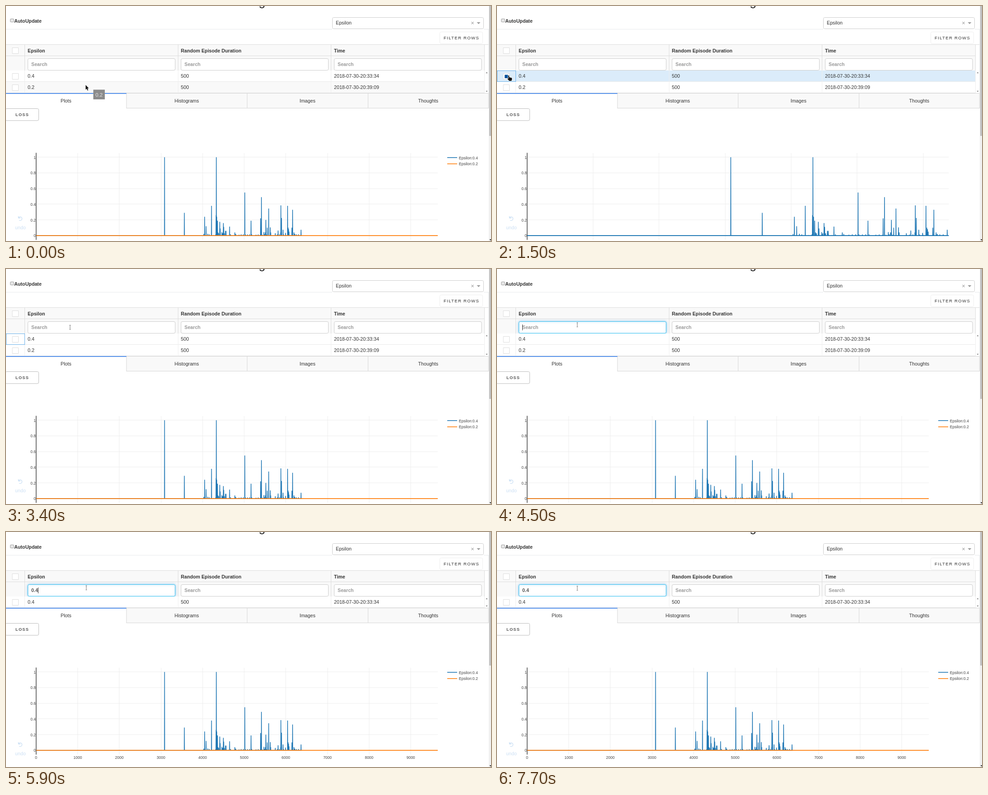
These frames come from a looping animation (1075 by 521 pixels, 8 s). An HTML page with a canvas:

```html
<!DOCTYPE html>
<html lang="en">
<head>
<meta charset="utf-8">
<title>Experiment dashboard</title>
<style>
  html, body { margin: 0; width: 100%; height: 100%; overflow: hidden; background: #fff; }
  canvas { display: block; }
</style>
</head>
<body>
<canvas id="stage" width="1075" height="521"></canvas>
<script>
const ctx = document.getElementById('stage').getContext('2d');
const LOOP = 8000;
const BLUE = '#1f77b4', ORANGE = '#ff7f0e', FONT = '"Liberation Sans", Arial, sans-serif';
const COLUMNS = [48, 387.5, 727];
const COLUMN_EDGES = [41, 381, 720, 1060];

// Training step and loss of each visible spike.
const SPIKES = [
  3086, 1, 3562, .29, 4029, .02, 4049, .24, 4084, .12, 4125, .022, 4214, .38, 4323, .26,
  4330, 1, 4340, .24, 4357, .19, 4371, .04, 4385, .03, 4412, .175, 4422, .09, 4463, .045,
  4480, .03, 4498, .16, 4508, .11, 4522, .03, 4549, .06, 4562, .06, 4648, .115, 4775, .04,
  4797, .02, 5014, .55, 5164, .19, 5393, .22, 5414, .49, 5472, .045, 5506, .04, 5519, .2,
  5554, .1, 5588, .345, 5626, .105, 5636, .04, 5745, .03, 5813, .065, 5875, .04, 5881, .385,
  5896, .225, 5933, .075, 5991, .035, 6042, .38, 6056, .1, 6066, .08, 6076, .05, 6145, .1,
  6162, .33, 6196, .04, 6216, .02, 6364, .075
];

function rect(x, y, w, h, color) {
  ctx.fillStyle = color;
  ctx.fillRect(x, y, w, h);
}

function box(x, y, w, h, radius, fill, stroke) {
  ctx.beginPath();
  ctx.roundRect(x, y, w, h, radius);
  ctx.fillStyle = fill;
  ctx.fill();
  ctx.lineWidth = 1;
  ctx.strokeStyle = stroke;
  ctx.stroke();
}

// y is the middle of the capitals.
function text(str, x, y, { size = 10.7, bold = false, color = '#333', align = 'left', spacing = 0 } = {}) {
  ctx.font = `${bold ? 'bold ' : ''}${size}px ${FONT}`;
  ctx.letterSpacing = spacing + 'px';
  ctx.textAlign = align;
  ctx.fillStyle = color;
  ctx.fillText(str, x, y + size * .355);
}

function polygon(points, fill, stroke) {
  ctx.beginPath();
  points.forEach(([x, y]) => ctx.lineTo(x, y));
  ctx.closePath();
  if (stroke) {
    ctx.strokeStyle = stroke;
    ctx.lineWidth = 1.4;
    ctx.stroke();
  }
  ctx.fillStyle = fill;
  ctx.fill();
}

// A negative height points up.
function triangle(x, y, halfWidth, height, color) {
  polygon([[x - halfWidth, y], [x + halfWidth, y], [x, y + height]], color);
}

function drawTop() {
  text('g', 567.5, -10.2, { size: 27, align: 'center', color: '#2b2b2b' });
  box(9.5, 28.5, 8, 7, 1.5, '#e6e6e6', '#a5a5a5');
  text('AutoUpdate', 18.3, 33.3, { bold: true });
  box(723.5, 25.5, 335, 25, 3, '#fff', '#ccc');
  text('Epsilon', 731, 37.7);
  text('×', 1034, 37, { size: 13, align: 'center', color: '#999' });
  triangle(1047.5, 36, 4, 4, '#999');
  rect(0, 51, 723, 1, '#e7eaec');
  rect(1059, 51, 11, 1, '#e7eaec');
  rect(1069, 51, 1, 142, '#e7eaec');
  box(961.5, 57.5, 95, 26, 3, '#fff', '#eee');
  text('FILTER ROWS', 970, 70.5, { size: 9.6, spacing: 1.3 });
}

function drawCheckbox(y, checked) {
  box(14, y, 13.5, 13, 0, '#fff', '#ddd');
  if (checked) rect(17, y + 3, 7.5, 7.5, '#00529b');
}

function drawSearch(x, value, focused, caret) {
  ctx.save();
  if (focused) {
    ctx.shadowColor = 'rgba(102,175,233,.7)';
    ctx.shadowBlur = 5;
  }
  box(x + .5, 116.5, 326.5, 26, 3, '#fff', focused ? '#33c3f0' : '#ccc');
  ctx.restore();
  text(value || 'Search', x + 8, 129.3, { bold: true, color: value ? '#555' : '#999' });
  if (caret) rect(x + 8 + (value ? ctx.measureText(value).width : 0), 123, 1, 13, '#333');
}

function drawGrid(t, filtered) {
  rect(0, 85, 1061, 58, '#f9f9f9');
  rect(0, 85, 1070, 1, '#ddd');
  rect(0, 110, 1061, 1, '#ddd');
  COLUMN_EDGES.forEach(x => rect(x, 86, 1, 57, '#ddd'));
  drawCheckbox(92.5);
  ['Epsilon', 'Random Episode Duration', 'Time'].forEach((name, i) =>
    text(name, COLUMNS[i], 99.7, { bold: true }));

  const typed = t < 5200 ? '' : t < 5600 ? '0' : t < 5900 ? '0.' : '0.4';
  const caret = (t >= 4500 && t < 5000) || (t >= 5200 && t < 6400) || (t >= 7100 && t < 7700);
  COLUMNS.forEach((x, i) => {
    const active = i === 0 && t >= 4400;
    drawSearch(x, i ? '' : typed, active, active && caret);
  });

  const selected = t >= 1000 && t < 2300;
  const hovered = t < 500 ? 1 : t < 3400 ? 0 : -1;
  const rows = [['0.4', '500', '2018-07-30-20:33:34'], ['0.2', '500', '2018-07-30-20:39:09']];
  rows.slice(0, filtered ? 1 : 2).forEach((cells, i) => {
    const y = 143 + 25 * i, chosen = i === 0 && selected;
    rect(0, y, 1061, 25, chosen ? '#dbecfa' : hovered === i ? '#f9f9f9' : '#fff');
    rect(0, y + 24, 1061, 1, '#e9e9e9');
    COLUMN_EDGES.forEach(x => rect(x, y, 1, 25, '#eee'));
    drawCheckbox(y + 6.5, chosen);
    cells.forEach((cell, j) => text(cell, COLUMNS[j], y + 12.3));
  });
  if (t >= 900 && t < 4400) {
    ctx.lineWidth = 1;
    ctx.strokeStyle = '#66afe9';
    ctx.strokeRect(.5, 143.5, 41, 24);
  }
  triangle(1065.5, 149, 2, -2.5, '#777');
  triangle(1065.5, filtered ? 163 : 188, 2, 2.5, '#777');
}

function drawTabs() {
  rect(0, 193, 1070, 34, '#f9f9f9');
  rect(267, 193, 803, 1, '#d6d6d6');
  rect(267, 226, 803, 1, '#d6d6d6');
  rect(0, 193, 267, 34, '#fff');
  rect(0, 193, 267, 1.7, '#3d82ea');
  [266.5, 534, 802, 1069].forEach(x => rect(x, 194, 1, 33, '#d6d6d6'));
  ['Plots', 'Histograms', 'Images', 'Thoughts'].forEach((name, i) =>
    text(name, 133 + 267.6 * i, 210.6, { align: 'center' }));
  box(-1.5, 227.5, 74, 26.5, 3, '#fff', '#bbb');
  text('LOSS', 21, 241, { size: 9.1, bold: true, color: '#555', spacing: 1.35 });
}

function drawChart(single) {
  const left = 66.7, right = single ? 1001.5 : 957, zero = 509, unit = 173.8;
  const perStep = single ? .14632 : .09227;
  const px = step => left + step * perStep;
  const label = { size: 8.5, color: '#444' };

  for (let step = 0; px(step) < right; step += 1000) {
    if (step) rect(Math.round(px(step)) - .5, 326, 1, 192, '#eee');
    text(step, px(step), 525.3, { ...label, align: 'center' });
  }
  for (let i = 0; i <= 5; i++) {
    const y = zero - unit * i / 5;
    if (i) rect(left, Math.round(y) - .5, right - left, 1, '#eee');
    text(i % 5 ? (i / 5).toFixed(1) : i / 5, 66, y + .3, { ...label, align: 'right' });
  }
  rect(66, 325.5, 1.5, 193, '#444');

  ctx.beginPath();
  ctx.moveTo(left, zero);
  const spike = (step, value) => {
    ctx.lineTo(px(step) - .3, zero);
    ctx.lineTo(px(step), zero - unit * value);
    ctx.lineTo(px(step) + .3, zero);
  };
  for (let i = 0; i < SPIKES.length; i += 2) spike(SPIKES[i], SPIKES[i + 1]);
  ctx.moveTo(px(4100), zero);
  for (let i = 0; i < 44; i++) spike(4110 + i * 51, .016 * Math.abs(Math.sin(i * i * 1.7)));
  ctx.lineJoin = 'bevel';
  ctx.lineWidth = 1.5;
  ctx.strokeStyle = BLUE;
  ctx.stroke();
  rect(left, zero - .9, (single ? right : px(6380)) - left, 1.8, BLUE);

  if (single) return;
  rect(left, zero - .9, right - left, 1.8, ORANGE);
  [[BLUE, '0.4'], [ORANGE, '0.2']].forEach(([color, value], i) => {
    rect(978, 335.3 + 13.8 * i, 22, 1.6, color);
    text('Epsilon:' + value, 1003.8, 336.5 + 13.8 * i, label);
  });
}

function drawFixed(filtered) {
  const color = '#cce0f4';
  ctx.strokeStyle = color;
  ctx.lineWidth = 1.4;
  ctx.beginPath();
  ctx.arc(31.5, 471.5, 4, -2.5, 2.2);
  ctx.moveTo(27.5, 466);
  ctx.lineTo(27.5, 470);
  ctx.lineTo(32, 470);
  ctx.stroke();
  text('undo', 32, 491.5, { align: 'center', color });
  rect(1070, 0, 5, 521, '#f1f1f1');
  rect(1071, 0, 4, filtered ? 296 : 288, '#c1c1c1');
  triangle(1074, 517, 2.5, 3, '#333');
}

function drawArrow(x, y) {
  const shape = [[0, 0], [0, 10.5], [2.4, 8.4], [4.2, 12.4], [5.8, 11.6], [4.1, 7.8], [7, 7.4]];
  polygon(shape.map(([dx, dy]) => [x + dx, y + dy]), '#111', '#fff');
}

function drawHand(x, y) {
  const shape = [[0, 0], [1.8, 0], [2.2, 4], [8, 5.5], [8.3, 8.5], [7, 12], [2, 12], [-2, 7.5], [-1, 6.4], [.4, 7.3]];
  polygon(shape.map(([dx, dy]) => [x + dx, y + dy]), '#111', '#fff');
}

function drawBeam(x, y) {
  rect(x - 1.5, y, 3, 1, '#888');
  rect(x - .5, y, 1, 10.5, '#777');
  rect(x - 1.5, y + 9.5, 3, 1, '#888');
}

function drawPointer(t) {
  if (t < 100) {
    rect(193.5, 185.5, 25.5, 21.5, '#8b8b8b');
    text('0.2', 206.2, 196.7, { size: 11.5, color: '#e4e4e4', align: 'center' });
  }
  if (t < 600) {
    const p = Math.floor(t / 100) / 6, ease = p * p * (3 - 2 * p);
    drawArrow(176.5 - 151.5 * ease, 175 - 20 * ease);
  } else if (t < 3400) drawHand(25, 154);
  else if (t < 3500) drawBeam(142, 124);
  else if (t < 3900) drawBeam(179.5, 113.5);
  else if (t < 4200) drawBeam(178.5, 117.5);
  else drawBeam(178, t < 7500 ? 118.5 : 119.5);
}

function draw(t) {
  const filtered = t >= 5900;
  rect(0, 0, 1075, 521, '#fff');
  drawTop();
  drawGrid(t, filtered);
  ctx.save();
  ctx.translate(0, filtered ? -25 : 0);
  drawTabs();
  drawChart(t >= 1500 && t < 3400);
  ctx.restore();
  drawFixed(filtered);
  drawPointer(t);
}

function frame() {
  draw(performance.now() % LOOP);
  requestAnimationFrame(frame);
}
frame();
</script>
</body>
</html>
```
